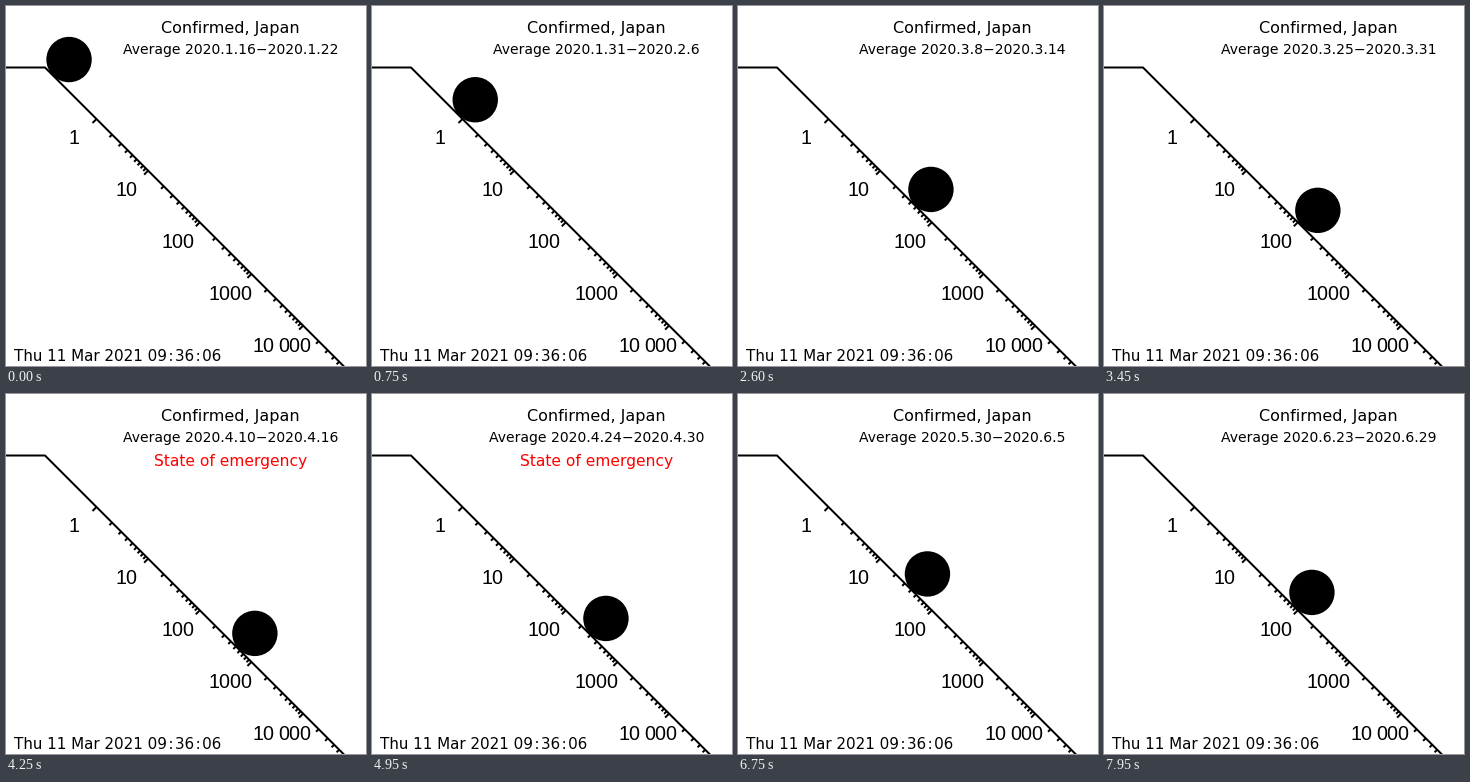
Write a matplotlib script that moves like this. It is 360 px wide and 360 px high and loops after 8000 ms.

```python
import matplotlib.pyplot as plt
import numpy as np
from matplotlib.animation import FuncAnimation
from matplotlib.patches import Circle

SIZE, FRAMES, STEP = 360, 160, 50
START = np.datetime64("2020-01-16")
EMERGENCY = np.datetime64("2020-04-07"), np.datetime64("2020-05-25")
X1, DECADE, DROP = 90.5, 51.65, 22.5   # place of value 1, px per decade, slope offset
FLAT, RADIUS = 61.5, 22.7

# Turning points of the curve: (day, cases in the week).
KEYS = [(0, 1), (1, 0.3), (2, 1), (10, 11), (13, 11), (20, 1), (29, 58),
        (34, 94), (52, 327), (59, 266), (83, 4100), (85, 3960), (102, 1764),
        (113, 558), (124, 205), (135, 280), (142, 266), (152, 400), (159, 638)]


def week_total(i):
    """Whole cases in the week that starts on day i, growing exponentially."""
    days, totals = np.array(KEYS).T
    return round(10 ** np.interp(i, days, np.log10(totals)))


def ball_center(i):
    total = week_total(i)
    if total == 0:
        return 27.5, FLAT - RADIUS
    x = X1 + 16.2 + DECADE * np.log10(total / 7)
    return x, x - 9.5


def dotted(day):
    d = day.item()
    return f"{d.year}.{d.month}.{d.day}"


fig = plt.figure(figsize=(SIZE / 72, SIZE / 72), dpi=72, facecolor="white")
ax = fig.add_axes([0, 0, 1, 1])
ax.set_xlim(0, SIZE)
ax.set_ylim(SIZE, 0)
ax.axis("off")


def label(x, y, text, size, ha="center", font="DejaVu Sans", color="black"):
    return ax.text(x, y, text, fontsize=size, ha=ha, va="baseline",
                   family=font, color=color)


def tick(value, length):
    x = X1 + DECADE * np.log10(value)
    y = x + DROP
    ax.plot([x, x - length], [y, y + length], color="black", lw=2,
            solid_capstyle="butt")


ax.plot([-5, FLAT - DROP, 365], [FLAT, FLAT, 365 + DROP], color="black", lw=2)

for k in range(5):
    tick(10 ** k, 4)
    for m in range(2, 10):
        tick(m * 10 ** k, 2.6)
    x, y = 68.4 + 51.9 * k, 138.5 + 51.75 * k
    if k < 4:
        label(x, y, str(10 ** k), 19.8, font="Liberation Sans")
    else:
        label(x - 7.2, y, "10", 19.8, "right", "Liberation Sans")
        label(x - 3.6, y, "000", 19.8, "left", "Liberation Sans")

label(224.7, 26.7, "Confirmed, Japan", 16)
clock = "\u200a:\u200a".join(["09", "36", "06"])
label(8, 354.7, f"Thu 11 Mar 2021 {clock}", 15.1, "left")
period = label(224.7, 48, "", 14)
alert = label(224.7, 72, "State of emergency", 15.5, color="red")
ball = ax.add_patch(Circle(ball_center(0), RADIUS, color="black", lw=0,
                           zorder=3))


def draw(i):
    first = START + i
    last = first + 6
    ball.center = ball_center(i)
    period.set_text(f"Average {dotted(first)}\u2212{dotted(last)}")
    alert.set_visible(bool(EMERGENCY[0] <= last <= EMERGENCY[1]))
    return ball, period, alert


anim = FuncAnimation(fig, draw, frames=FRAMES, interval=STEP,
                     init_func=lambda: draw(0), repeat=True, repeat_delay=0)
plt.show()
```
